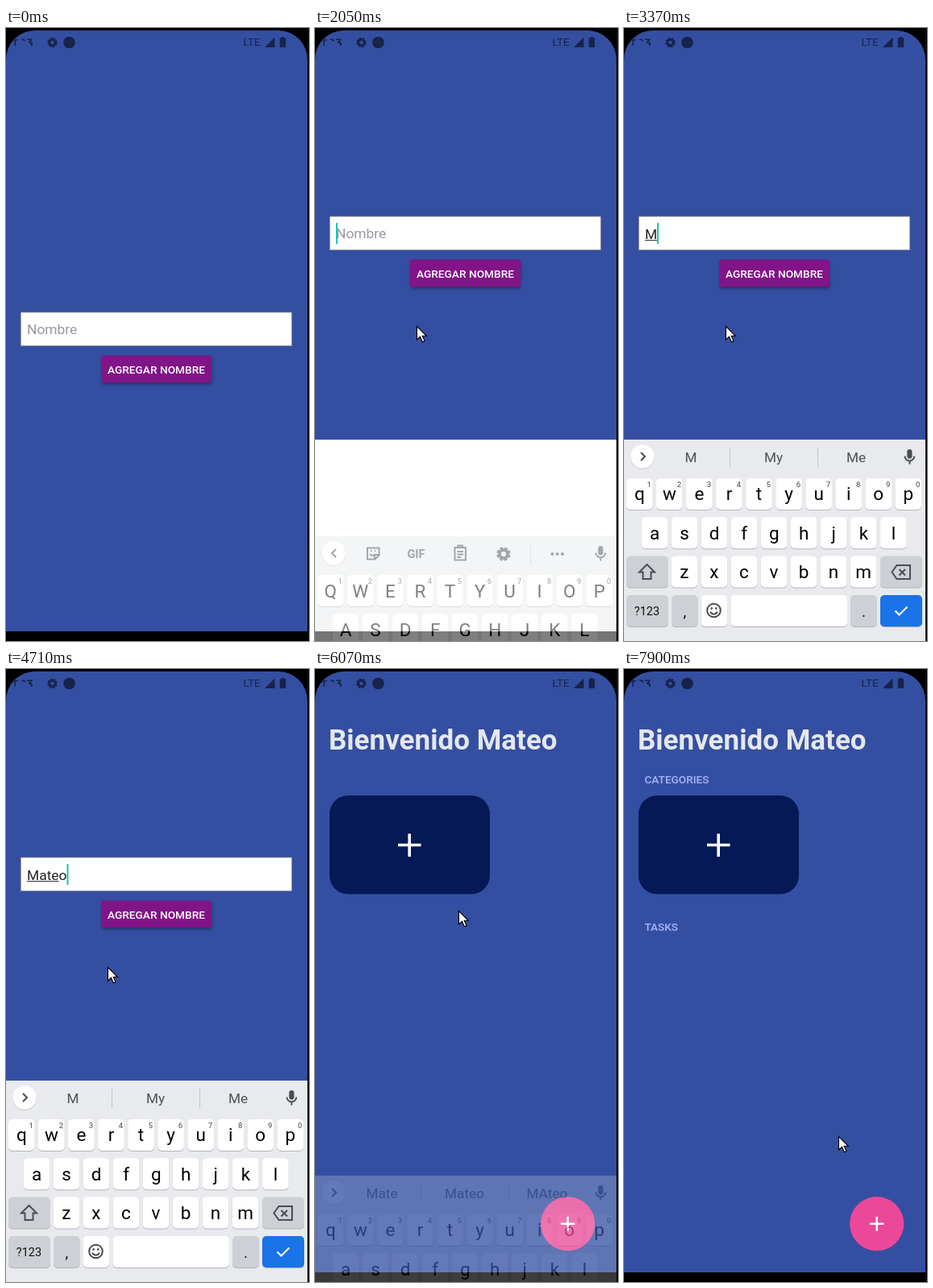
Recreate the animation shown at these times as an HTML page. Size 376x761 px, loop 8000 ms.

```html
<!DOCTYPE html>
<html lang="es">
<head>
<meta charset="utf-8">
<title>Bienvenido</title>
<style>
html, body { margin: 0; width: 100%; height: 100%; overflow: hidden; background: #000; }
svg { display: block; width: 376px; height: 761px; font-family: Roboto, sans-serif; }
.mid { text-anchor: middle; }
.medium { font-weight: 500; }
.line { fill: none; stroke: #4a4d51; stroke-width: 2; }
.soft { opacity: .75; }

/* Hard switches */
.step { animation: 8s step-end infinite; }
#form { animation-name: form; }
#gap { animation-name: gap; }
#home { animation-name: home; }
#fab { animation-name: fab; }
#placeholder, #caps, #tools { animation-name: untilTyped; }
#lower { animation-name: onceTyped; }
#first { animation-name: firstWords; }
#second { animation-name: secondWords; }
#typed { animation-name: typed; }
#underline { animation-name: underline; }
#caret { animation-name: caretMove; }
#caret rect { animation-name: blink; }

/* Continuous motion */
.move { animation: 8s linear infinite; }
#keyboard { animation-name: keyboard; }
#ripple { animation-name: ripple; }
#labels { animation-name: labels; }
#pointer { animation-name: pointer; }

@keyframes form {
  0% { transform: none; visibility: visible; }
  24.125% { transform: translateY(-119px); visibility: visible; }
  74.625%, 100% { transform: translateY(-119px); visibility: hidden; }
}
@keyframes gap { 0% { opacity: 0; } 24.125% { opacity: 1; } 75.625%, 100% { opacity: 0; } }
@keyframes home { 0% { opacity: 0; } 74.625%, 100% { opacity: 1; } }
@keyframes fab { 0% { transform: translateY(-238px); } 75.625%, 100% { transform: none; } }
@keyframes untilTyped { 0% { opacity: 1; } 39.375%, 100% { opacity: 0; } }
@keyframes onceTyped { 0% { opacity: 0; } 39.375%, 100% { opacity: 1; } }
@keyframes firstWords { 0% { opacity: 0; } 39.375% { opacity: 1; } 60.5%, 100% { opacity: 0; } }
@keyframes secondWords { 0% { opacity: 0; } 60.5%, 100% { opacity: 1; } }
@keyframes typed {
  0% { width: 0; } 39.375% { width: 15.4px; } 45% { width: 24.7px; }
  49.75% { width: 30.5px; } 54.125% { width: 39.6px; } 58.5%, 100% { width: 60px; }
}
@keyframes underline {
  0% { width: 0; } 39.375% { width: 15px; } 49.75% { width: 24.5px; }
  54.125% { width: 30.3px; } 58.5%, 100% { width: 39.5px; }
}
@keyframes caretMove {
  0% { transform: none; } 39.375% { transform: translateX(15px); } 45% { transform: translateX(24.5px); }
  49.75% { transform: translateX(30.3px); } 54.125% { transform: translateX(39.5px); }
  58.5%, 100% { transform: translateX(49.5px); }
}
@keyframes blink {
  0% { opacity: 0; } 21.625% { opacity: 1; } 27.75% { opacity: 0; } 34% { opacity: 1; }
  63.75% { opacity: 0; } 70% { opacity: 1; } 73.6%, 100% { opacity: 0; }
}
@keyframes keyboard {
  0%, 24.125% { transform: translateY(250px); opacity: 0; }
  25.625%, 26.8% { transform: translateY(120px); opacity: .5; }
  27.5% { transform: translateY(40px); opacity: .85; }
  29%, 75.25% { transform: none; opacity: 1; }
  75.875%, 76.3% { transform: translateY(118px); opacity: .24; }
  78.375%, 100% { transform: translateY(250px); opacity: 0; }
}
@keyframes ripple { 0%, 73% { opacity: 0; } 74.1%, 100% { opacity: 1; } }
@keyframes labels { 0%, 78.8% { opacity: 0; } 81%, 89.6% { opacity: .88; } 91%, 100% { opacity: 1; } }
@keyframes pointer {
  0%, 1.62% { transform: translate(320px, 497px); opacity: 0; }
  1.625% { transform: translate(320px, 497px); opacity: 1; }
  5% { transform: translate(230px, 474px); }
  8.125% { transform: translate(150px, 442px); }
  11.5%, 11.75% { transform: translate(132px, 416px); }
  13%, 13.375% { transform: translate(129px, 407px); }
  19.625%, 68.625% { transform: translate(126px, 370px); }
  69.5% { transform: translate(141px, 368px); }
  70.75% { transform: translate(195px, 355px); }
  71.75% { transform: translate(201px, 325px); }
  73%, 78.875% { transform: translate(178px, 300px); }
  88.375%, 89.625% { transform: translate(216px, 384px); }
  94% { transform: translate(256px, 515px); }
  98.75%, 100% { transform: translate(266px, 580px); opacity: 1; }
}
</style>
</head>
<body>
<svg viewBox="0 0 376 761">
  <defs>
    <g id="gear" fill="none" stroke="currentColor">
      <circle r="3.6" stroke-width="2.8"/>
      <circle r="5.3" stroke-width="1.9" stroke-dasharray="2.6 1.56" transform="rotate(9)"/>
    </g>
    <clipPath id="reveal"><rect id="typed" class="step" x="26" y="355" width="0" height="38"/></clipPath>
    <radialGradient id="dark" gradientUnits="userSpaceOnUse" cx="190" cy="424" r="60">
      <stop offset=".3" stop-opacity=".22"/><stop offset="1" stop-opacity="0"/>
    </radialGradient>
    <filter id="blur" x="-10%" y="-30%" width="120%" height="160%"><feGaussianBlur stdDeviation="2"/></filter>
  </defs>

  <rect width="376" height="761"/>
  <rect x="374" width="2" height="761" fill="#0c0c0c"/>
  <path d="M0 749V39A36 36 0 0 1 36 3H338A36 36 0 0 1 374 39V749Z" fill="#344fa1"/>

  <g fill="#17234a" color="#17234a">
    <path d="M8 14h7v1.6H12V22h-1.6v-6.4H8ZM19 13l5 1.5v2l-5-2ZM26 13.5h6.5v1.6L30.500 17c2.500.5 3 2.500 2.300 5h-1.800c.5-2-.4-3.500-3-3.600v-1.200l2-2.100h-4Z"/>
    <use href="#gear" x="57.500" y="18"/>
    <circle cx="78.500" cy="18" r="7.300"/>
    <text x="294.500" y="22.300" font-size="13.500">LTE</text>
    <path d="M333.500 11.500V24H321ZM342 11h3v1.300h2.200V24h-7.400V12.300H342Z"/>
  </g>

  <rect id="gap" class="step" y="511" width="374" height="238" fill="#fff"/>

  <g id="form" class="step">
    <rect x="18.300" y="353" width="336.400" height="41.500" fill="#fff" stroke="#8f8a94" stroke-width=".7"/>
    <text id="placeholder" class="step" x="26" y="380" font-size="17.400" fill="#9a96a0">Nombre</text>
    <g clip-path="url(#reveal)"><text x="26" y="380.500" font-size="17.400" fill="#222">Mateo</text></g>
    <rect id="underline" class="step" x="26" y="382" width="0" height="1" fill="#333"/>
    <g id="caret" class="step"><rect class="step" x="26" y="361" width="2" height="26" fill="#1fc2b6"/></g>
    <rect x="119" y="409" width="136" height="33" rx="2" opacity=".4" filter="url(#blur)"/>
    <rect x="118" y="406.500" width="137" height="33.500" rx="2" fill="#811487"/>
    <rect id="ripple" class="move" x="118" y="406.500" width="137" height="33.500" rx="2" fill="url(#dark)"/>
    <text class="mid medium" x="186.500" y="428.800" font-size="13.700" fill="#fff">AGREGAR NOMBRE</text>
  </g>

  <g id="home" class="step">
    <text x="17" y="100" font-size="35" font-weight="700" fill="#e5e7eb">Bienvenido Mateo</text>
    <rect x="18" y="157" width="199" height="122.500" rx="23" fill="#041955"/>
    <path d="M103 218.500h28.500M117.200 204.500v28.500" stroke="#fff" stroke-width="3.600"/>
    <g id="labels" class="move medium" font-size="13.600" fill="#a5b4fc">
      <text x="25.500" y="142">CATEGORIES</text>
      <text x="25.500" y="325">TASKS</text>
    </g>
    <g id="fab" class="step">
      <circle cx="313.700" cy="688.700" r="33.600" fill="#ec4899"/>
      <path d="M305 688.700h17.400M313.700 680v17.400" stroke="#fff" stroke-width="2.500"/>
    </g>
  </g>

  <g id="keyboard" class="move">
    <rect y="511" width="374" height="250" fill="#e8eaed"/>
    <circle cx="23" cy="533" r="15" opacity=".13"/>
    <circle cx="23" cy="532" r="14.700" fill="#fff"/>
    <g fill="#4a4d51">
      <rect x="351.300" y="523" width="6.200" height="11.500" rx="3.100"/>
      <path class="line" stroke-width="1.700" d="M348.500 531.500a5.900 5.900 0 0 0 11.800 0M354.400 537.500v4"/>
    </g>
    <g id="keys" fill="#111"></g>
    <g id="lower" class="step">
      <path class="line" d="M21 527l5 5-5 5"/>
      <path d="M131.500 521v24M240.500 521v24" stroke="#c3c6ca"/>
      <g id="first" class="step mid" font-size="17.200" fill="#4e5155"></g>
      <g id="second" class="step mid" font-size="17.200" fill="#4e5155"></g>
      <path class="line" d="M28.500 666l-9.500 9.500h4.500v8.500h10v-8.500h4.500Z"/>
    </g>
    <g id="caps" class="step">
      <path d="M28.500 665l-10.500 11h5v8.500h11v-8.500h5Z" fill="#4a4d51"/>
    </g>
    <g id="tools" class="step soft" color="#4a4d51">
      <path class="line" d="M26 527l-5 5 5 5"/>
      <path class="line" d="M65 525.500h14.500v9l-5 5H65ZM79 534h-5v5M68 533q3 4 6 0"/>
      <path d="M69 529h1.500M74 529h1.500" stroke="#4a4d51" stroke-width="2"/>
      <text class="mid" x="125.500" y="537.500" font-size="14.500" font-weight="700" fill="#4a4d51">GIF</text>
      <path class="line" d="M173.500 525h13.500v15.500h-13.500ZM177.500 525v-2.500h5.500v2.500M176.500 530h7.500M176.500 533.500h7.500M176.500 537h5"/>
      <use href="#gear" transform="translate(234 533) scale(1.400)"/>
      <path d="M267.500 521v24" stroke="#c3c6ca"/>
      <g fill="#4a4d51"><circle cx="294.500" cy="533" r="2"/><circle cx="300.700" cy="533" r="2"/><circle cx="307" cy="533" r="2"/></g>
    </g>
    <path class="line" stroke-width="1.800" d="M338.500 667h16.500v17h-16.500l-6-8.500ZM341.500 672l7.500 7.500m0-7.500l-7.500 7.500"/>
    <g>
      <circle class="line" stroke-width="1.700" cx="111.500" cy="723" r="8.300"/>
      <path class="line" d="M107 725q4.500 5.500 9 0"/>
      <path d="M107.500 720.500h2.400M113.100 720.500h2.400" stroke="#4a4d51" stroke-width="2.400"/>
    </g>
    <path d="M336.500 723.500l5 5 10-10" fill="none" stroke="#fff" stroke-width="2.200"/>
  </g>

  <path id="pointer" class="move" d="M.5.5V17L4.500 13.300 7.300 19.800 10 18.600 7.200 12.300H12.300Z" fill="#fff" stroke="#000" stroke-width="1.100"/>
</svg>
<script>
const byId = id => document.getElementById(id);

function add(parent, tag, attrs, content = '') {
  const node = document.createElementNS('http://www.w3.org/2000/svg', tag);
  for (const name in attrs) node.setAttribute(name, attrs[name]);
  node.textContent = content;
  parent.append(node);
}

function addKey(x, y, width, fill = '#fff') {
  const box = { x, width, height: 39, rx: 5 };
  add(byId('keys'), 'rect', { ...box, y: y + 1, fill: '#b1b4b9' });
  add(byId('keys'), 'rect', { ...box, y, fill });
}

function addLabel(parent, text, x, y, size) {
  add(parent, 'text', { x, y, 'font-size': size, class: 'mid' }, text);
}

const pitch = 37.05;
['qwertyuiop', 'asdfghjkl', 'zxcvbnm'].forEach((letters, row) => {
  const y = 559 + row * 48.2;
  const start = [19.3, 38, 74.8][row];
  [...letters].forEach((letter, i) => {
    const x = start + i * pitch;
    addKey(x - 16.3, y, 32.6);
    addLabel(byId('lower'), letter, x, y + 27.3, 22.5);
    addLabel(byId('caps'), letter.toUpperCase(), x, y + 27.8, 22.5);
    if (row === 0) {
      add(byId('keys'), 'text', { x: x + 12, y: y + 11, 'font-size': 9.5, class: 'mid medium', fill: '#66696d' }, (i + 1) % 10);
    }
  });
});

const grey = '#cdd0d5';
addKey(3, 655.4, 52, grey);
addKey(318, 655.4, 52, grey);
addKey(3, 704, 52, grey);
addKey(59, 704, 32.5, grey);
addKey(95.5, 704, 32.5);
addKey(132.5, 704, 144.5);
addKey(281, 704, 33, grey);
addKey(318, 704, 52, '#1a73e8');
addLabel(byId('keys'), '?123', 28.5, 728.5, 14.5);
addLabel(byId('keys'), ',', 75.3, 731, 19);
addLabel(byId('keys'), '.', 297.5, 731, 19);

const addWords = (id, words) =>
  words.forEach((word, i) => addLabel(byId(id), word, [83, 185.5, 288][i], 539, 17.2));
addWords('first', ['M', 'My', 'Me']);
addWords('second', ['Mate', 'Mateo', 'MAteo']);
</script>
</body>
</html>
```
